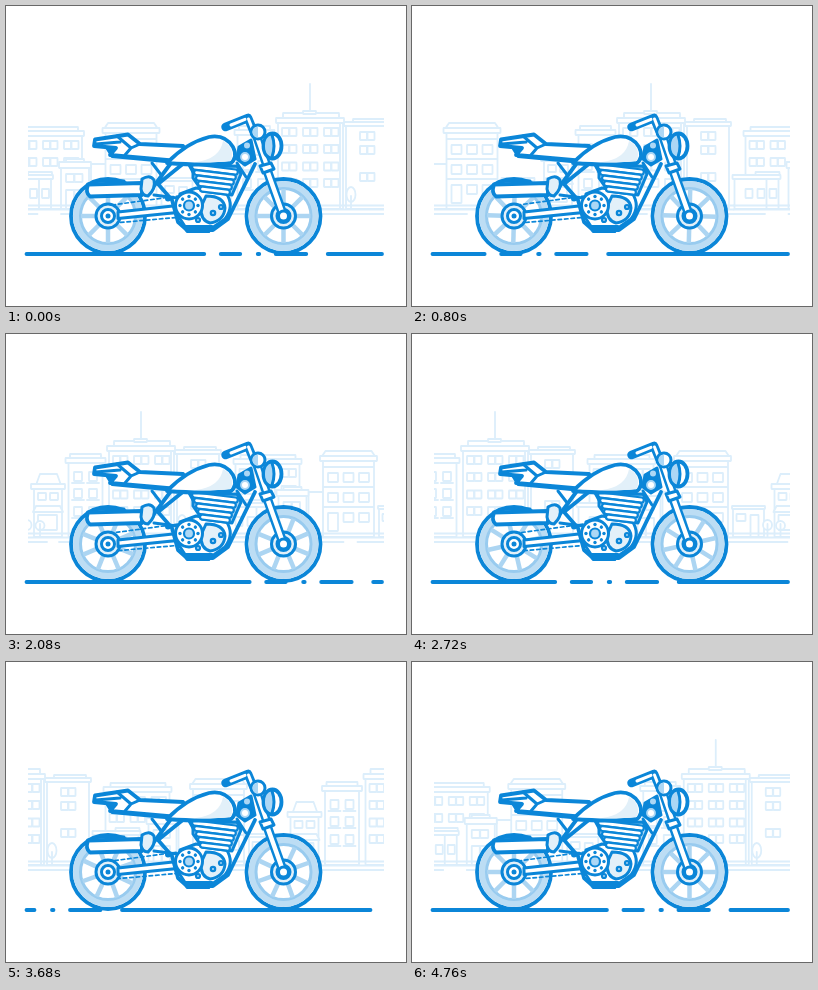
These frames come from a looping animation (400 px wide and 300 px high, 4800 ms). An HTML page:

```html
<!DOCTYPE html>
<html lang="en">
<head>
<meta charset="utf-8">
<title>Motorbike ride</title>
<style>
html, body { margin: 0; width: 100%; height: 100%; overflow: hidden; background: #fff; }
svg { display: block; width: 400px; height: 300px; }
.city { fill: #fff; stroke: #dceefb; stroke-width: 1.8; stroke-linejoin: round; stroke-linecap: round; }
.city .line { fill: none; }
.city .shade { fill: #e6f3fc; stroke: none; }
.bike { fill: none; stroke: #0b86d8; stroke-width: 3.8; stroke-linejoin: round; stroke-linecap: round; }
.white { fill: #fff; }
.pale { fill: #e2f0f9; }
.tint { fill: #acd7f5; }
.blue { fill: #0b86d8; }
.bare { stroke: none; }
.thin { stroke-width: 2.2; }
.mid { stroke-width: 3; }
.gloss { stroke: #fff; }
.tire { stroke: #bcddf4; stroke-width: 7; }
.rim { stroke: #98cbef; stroke-width: 3; }
.spoke { stroke: #acd5f2; stroke-width: 4.5; stroke-linecap: butt; }
.chain { stroke-width: 1.7; stroke-dasharray: 3.5 3; }
.road { stroke: #0b86d8; stroke-width: 3.8; stroke-linecap: round;
  stroke-dasharray: 248.5 16.5 19.5 17.5 1.5 16.5 30.5 21.5; }
</style>
</head>
<body>
<svg viewBox="0 0 400 300">
  <defs>
    <clipPath id="view"><rect x="22" y="70" width="356" height="145"/></clipPath>
    <g id="block"></g>
    <g id="wheel">
      <circle class="white" r="37"/>
      <circle class="tire" r="31.5"/>
      <circle class="rim" r="27.5"/>
    </g>
    <g id="hub">
      <circle class="pale mid" r="12"/>
      <circle class="white mid" r="6.5"/>
      <circle class="blue bare" r="2.5"/>
    </g>
  </defs>

  <g clip-path="url(#view)">
    <g id="city" class="city">
      <use href="#block" x="-386.5"/><use href="#block"/><use href="#block" x="386.5"/>
    </g>
  </g>

  <path id="road" class="road" d="M20.5 248H376"/>

  <g class="bike">
    <g transform="translate(102 210)"><use href="#wheel"/><g class="spokes"></g></g>
    <g transform="translate(277.5 210)"><use href="#wheel"/><g class="spokes"></g></g>

    <!-- swing arm and chain -->
    <path class="chain" d="M106 199L172 190M108 217L176 211"/>
    <use href="#hub" x="102" y="210"/>
    <path class="white mid" d="M112 206L176 199V206L112 212.500Z"/>

    <!-- frame -->
    <path d="M165 157L142 188M178 157L152 178L166 194L172 216L181 224H207L222 213L249 158"/>
    <path class="mid" d="M146 157L156 170M182 157L188 168M231 157L240 171"/>

    <!-- engine -->
    <path class="white mid" d="M174 188L190 182L220 187Q229 200 219 213L206 222H180L171 208Z"/>
    <path class="tint mid" d="M187 161L231 160L235 168L226 189L196 185L187 172Z"/>
    <g id="fins" class="white thin"></g>
    <path class="pale mid" d="M200 190Q218 190 219 202Q218 215 204 217Q194 214 195 201Z"/>
    <g class="tint thin">
      <circle cx="207" cy="207" r="2.2"/><circle cx="215" cy="201" r="2"/><circle cx="192" cy="214" r="2"/>
    </g>
    <circle class="white mid" cx="183" cy="199.500" r="13.5"/>
    <g id="bolts" class="blue bare"></g>
    <circle class="tint thin" cx="183" cy="199.500" r="5"/>
    <path class="blue thin" d="M177 220H206L203 226H181Z"/>

    <!-- exhaust -->
    <path class="mid" d="M83 178Q94 173 118 175M148 189L171 192"/>
    <path class="white" d="M82 178.500L136 177V189L84 190.500Q79 187 82 178.500Z"/>
    <path class="pale mid" d="M136 173Q144 168 148 174Q150 183 142 190Q136 190 135 183Z"/>
    <circle class="blue bare" cx="162" cy="192.500" r="3"/>

    <!-- seat -->
    <path class="blue thin" d="M101 143L132 148L173 154L170 157L106 151Z"/>
    <path class="white" d="M89 133.500L122 128.500L134 138L177 140L181 147L172 155L104 149L110 142L88 140Z"/>
    <path class="mid" d="M111 130L125 142L119 149M125 142L134 138M90 138L114 136"/>

    <!-- tank -->
    <path class="white" d="M161 157Q180 137 203 131Q219 128 227 141Q232 151 225 157Q200 160 161 157Z"/>
    <path class="pale bare" d="M190 156Q214 153 217 135Q229 141 225 155Q208 157 190 156Z"/>

    <!-- bars, fork and lamp -->
    <path class="blue mid" d="M233 141L245 134L249 153L239 159L231 153Z"/>
    <circle class="tint thin" cx="239" cy="151" r="6"/>
    <circle class="white bare" cx="239" cy="151" r="3"/>
    <circle class="tint bare" cx="241" cy="139.500" r="3"/>
    <use href="#hub" x="277.5" y="210"/>
    <path d="M250 128L261 160" stroke-width="9"/>
    <path class="gloss" d="M250 128L261 160" stroke-width="4"/>
    <path d="M261 164L276 206" stroke-width="9.5"/>
    <path class="gloss" d="M261 164L276 206" stroke-width="4.5"/>
    <circle class="white mid" cx="277.500" cy="210" r="5"/>
    <path class="white mid" d="M254 160L265 157L268 163L257 167Z"/>
    <path d="M219.500 121L242 112L247 124" stroke-width="8.5"/>
    <path class="gloss" d="M225 119L239 113.300M242.500 113L246 122" stroke-width="3"/>
    <circle class="white mid" cx="252" cy="126" r="7"/>
    <path class="tint bare" d="M252 120.500A5.500 5.500 0 0 0 252 131.500Z"/>
    <ellipse class="white" cx="266.500" cy="140" rx="9" ry="12.500"/>
    <path class="tint bare" d="M265 129.500Q259 131 259 140T265 150.500Q271 140 265 129.500Z"/>
    <path class="mid" d="M266 129Q270 140 266 151"/>
  </g>
</svg>
<script>
const LOOP = 4800, STEP = 40, CITY_SPEED = 0.08125, ROAD_SPEED = 0.157;
const $ = id => document.getElementById(id);
const each = (list, fn) => list.map(fn).join('');

const rect = (x, y, w, h, cls = '') =>
  `<rect class="${cls}" x="${x}" y="${y}" width="${w}" height="${h}" rx=".5"/>`;
const line = d => `<path class="line" d="${d}"/>`;
const windows = (xs, ys, w = 8, h = 8) => each(ys, y => each(xs, x => rect(x, y, w, h)));
const house = (x, y, w, inset = 3, lip = 5) =>
  rect(x + inset, y, w - 2 * inset, 203 - y) + rect(x, y, w, lip);
const bush = (x, h = 15) =>
  `<ellipse cx="${x}" cy="${196 - h / 2}" rx="4.5" ry="${h / 2}"/>` + line(`M${x} 190V203`);

function city() {
  const tower = rect(277, 107, 56, 6) + house(270, 112, 68, 2) + rect(334, 117, 3, 86, 'shade') +
    rect(297, 105, 13, 3) + line('M304 78V105') +
    windows([276, 283.5, 297, 304.5, 318, 325.5], [122, 139, 156.5, 173], 7);
  const offices = rect(347, 113, 32, 4) + house(338, 116, 46, 2, 4) +
    windows([354, 361.5], [126, 140, 167], 7);
  const flats = rect(17, 121, 55, 4) + house(10, 125, 68, 2) +
    windows([16, 23.5, 37, 44.5, 58, 65.5], [135, 152], 7);
  const shop = rect(60, 153, 18, 4) + house(53, 156, 32, 2, 6) +
    windows([60, 68.5], [168]) + windows([60, 68.5], [184], 8, 19);
  const cottage = rect(22, 166, 24, 4) + house(-1, 169, 48, 2, 4) +
    windows([12, 24, 36], [183], 7, 9) + line('M33 173V203');
  const hotel = `<path d="M102 117H148L152 123H98Z"/>` + house(96.5, 122, 57, 3, 5) +
    line('M100 133H150M100 153H150M100 173H150') +
    windows([104.5, 120, 135.5], [139, 159], 10, 9) +
    rect(104.5, 179, 10, 18) + windows([120, 135.5], [179], 10, 9);
  const kiosk = house(154.5, 172, 33, 1, 3) + windows([159], [180], 9, 7) + rect(173, 181, 8, 22);
  const cafe = `<path d="M203 140H220L224 151H199Z"/>` + house(194, 150, 34, 3, 5) +
    windows([201, 213], [159], 8, 7) + `<path d="M199 172H223L226 178H196Z"/>` +
    rect(201, 181, 19, 15);
  const inn = rect(233, 120, 31, 5) + house(228.5, 124, 40, 3, 5) +
    each([138, 155, 173], y => windows([237, 252], [y], 8, 9) + line(`M235 ${y + 11}H247M250 ${y + 11}H262`));
  const low = rect(85, 158, 15, 45);
  const ground = line('M0 199.5H386.5M0 203.5H386.5') +
    line('M315 208H418M55 208H120M134 208H210M222 208H300');
  return low + hotel + kiosk + cafe + inn + offices + tower + flats + shop + cottage +
    bush(345) + bush(190, 10) + bush(203, 9) + ground;
}

const ring = (n, fn) => each([...Array(n).keys()], i => fn(i * 360 / n));

$('block').innerHTML = city();
$('fins').innerHTML = each([0, 1, 2, 3, 4], i =>
  `<rect x="${186 + i * 2}" y="${161 + i * 5.3}" width="${46 - i * 4}" height="5" rx="2.5" transform="rotate(7 209 ${163 + i * 5.3})"/>`);
$('bolts').innerHTML = ring(8, a =>
  `<circle cx="183" cy="190.5" r="1.7" transform="rotate(${a} 183 199.5)"/>`);
const spokes = document.querySelectorAll('.spokes');
spokes.forEach(s => {
  s.innerHTML = ring(8, a => `<path class="spoke" d="M0 -11V-27" transform="rotate(${a})"/>`);
});
const chain = document.querySelector('.chain');

function draw(now) {
  const t = Math.floor(now % LOOP / STEP) * STEP;
  $('city').setAttribute('transform', `translate(${-t * CITY_SPEED} 0)`);
  $('road').setAttribute('stroke-dashoffset', 70.75 + t * ROAD_SPEED);
  spokes.forEach(s => s.setAttribute('transform', `rotate(${t * 1080 / 4760})`));
  chain.setAttribute('stroke-dashoffset', -t * 0.0396);
}

const start = performance.now();
function tick() {
  draw(performance.now() - start);
  requestAnimationFrame(tick);
}
draw(0);
requestAnimationFrame(tick);
</script>
</body>
</html>
```
